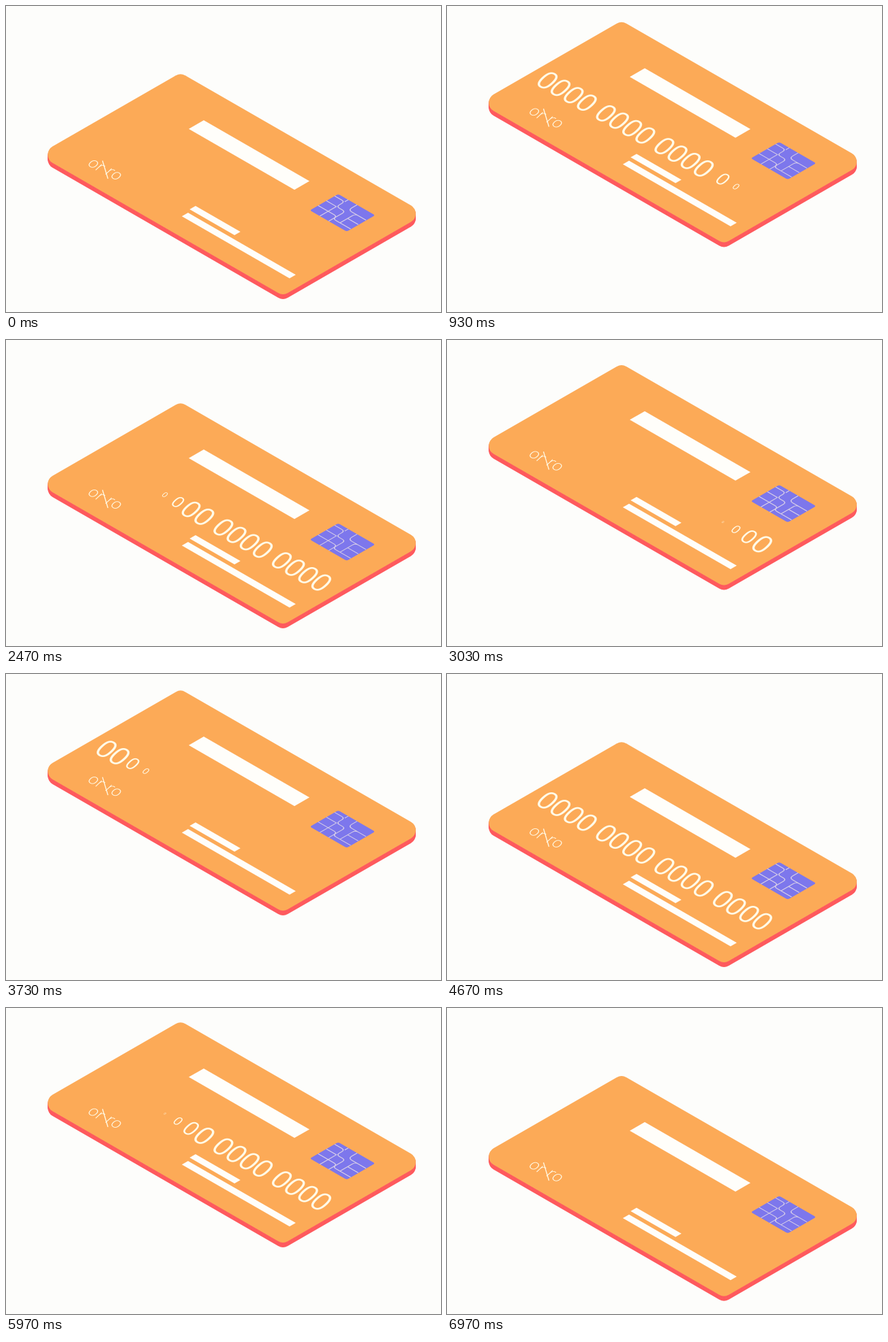
Animation of 638x450 px, one loop 7010 ms. Source, as an HTML page with a canvas:

```html
<!DOCTYPE html>
<html lang="en">
<head>
<meta charset="utf-8">
<title>Bank card</title>
<style>
  html, body { margin: 0; width: 100%; height: 100%; overflow: hidden; background: #fdfdfb; }
  canvas { display: block; }
</style>
</head>
<body>
<canvas id="stage" width="638" height="450"></canvas>
<script>
const ctx = document.getElementById('stage').getContext('2d');
const LOOP = 7010, FRAMES = 210, BOB = 70;
const COS = Math.cos(Math.PI / 6), SIN = 0.5;
const CARD = { x: 256, y: 98.2, w: 414.5, h: 241, r: 14, depth: 7 };
const COLOR = {
  back: '#fdfdfb', face: '#fcaa57', side: '#fe5a5e',
  bar: '#fffefa', ink: '#fffbe8', chip: '#7d77ec', wire: 'rgba(255,246,230,.7)'
};
const FONT = '"Open Sans", "Noto Sans", sans-serif';

// CSS-style cubic easing, solved by bisection
function bezier(x1, y1, x2, y2) {
  const at = (a, b, t) => 3 * (1 - t) * (1 - t) * t * a + 3 * (1 - t) * t * t * b + t * t * t;
  return x => {
    let lo = 0, hi = 1;
    for (let i = 0; i < 30; i++) {
      const mid = (lo + hi) / 2;
      if (at(x1, x2, mid) < x) lo = mid; else hi = mid;
    }
    return at(y1, y2, lo);
  };
}
const rise = bezier(0.3, 0.13, 0.5, 1);
const fall = bezier(0.5, 0, 0.68, 1);
const clamp = x => Math.max(0, Math.min(1, x));

// Vertical shift of the card, from 0 up to -80.5
function lift(frame) {
  const p = (frame % BOB) / (BOB / 2);
  return -80.5 * (p < 1 ? rise(p) : 1 - fall(p - 1));
}

function digitScale(frame, i) {
  const f = frame >= 104 ? frame - 104 : frame;
  const shown = clamp((f - 2 * i) / 6);
  const hidden = clamp((f - 61.7 - 2 * i) / 6);
  return shown - hidden;
}

// Card plane: x runs down-right, y runs down-left
function plane(y) {
  ctx.setTransform(COS, SIN, -COS, SIN, 256, 96.3 + y);
}

function box(x, y, w, h, r, color) {
  ctx.fillStyle = color;
  ctx.beginPath();
  ctx.roundRect(x, y, w, h, r);
  ctx.fill();
}

// Rhombus whose corners are rounded with true circles
function slab(y, color) {
  const { w, h, r } = CARD;
  const at = (u, v) => [CARD.x + (u - v) * COS, CARD.y + y + (u + v) * SIN];
  const corners = [at(w, 0), at(w, h), at(0, h), at(0, 0)];
  ctx.setTransform(1, 0, 0, 1, 0, 0);
  ctx.beginPath();
  ctx.moveTo(...at(w / 2, 0));
  corners.forEach((c, i) => ctx.arcTo(...c, ...corners[(i + 1) % 4], r));
  ctx.closePath();
  ctx.fillStyle = color;
  ctx.fill();
}

function cardBody(y) {
  for (let d = CARD.depth; d > 0; d--) slab(y + d, COLOR.side);
  slab(y, COLOR.face);
}

function chip() {
  ctx.save();
  ctx.translate(313.6, 46.6);
  box(0, 0, 62.5, 48, 3, COLOR.chip);
  ctx.strokeStyle = COLOR.wire;
  ctx.lineWidth = 1.2;
  ctx.stroke(new Path2D(
    'M0 6H12Q17 6 17 11V15Q17 20 22 20H27Q32 20 32 25V36Q32 41 37 41H62 ' +
    'M0 20H17V34 M0 34H27Q32 34 32 39V48 M17 34V48 ' +
    'M62 15H49Q44 15 44 20V41 M62 28H44 M32 0V9Q32 15 38 15H49 M17 6V0'));
  ctx.restore();
}

function word(text, x, y, size, weight, scale) {
  ctx.setTransform(COS * scale, SIN * scale, -0.75 * scale, 0.7 * scale, x, y);
  ctx.font = `${weight} ${size}px ${FONT}`;
  ctx.fillText(text, 0, 0.357 * size);
}

function digits(frame, y) {
  for (let i = 0; i < 16; i++) {
    const scale = digitScale(frame, i);
    if (scale < 0.02) continue;
    const s = 22.3 * i + 10.1 * Math.floor(i / 4);
    word('0', 147.5 + s * 0.863, 186 + s * 0.487 + y, 40.5, 500, scale);
  }
}

function label(y) {
  word('or', 133.5, 233 + y, 23, 300, 1);
  word('ro', 159.5, 246 + y, 23, 300, 1);
  ctx.setTransform(1, 0, 0, 1, 0, y);
  ctx.strokeStyle = COLOR.ink;
  ctx.lineWidth = 1.3;
  ctx.beginPath();
  ctx.moveTo(141.5, 227.5);
  ctx.lineTo(149.5, 254);
  ctx.stroke();
}

function draw(frame) {
  const y = lift(frame);
  ctx.setTransform(1, 0, 0, 1, 0, 0);
  ctx.fillStyle = COLOR.back;
  ctx.fillRect(0, 0, 638, 450);

  cardBody(y);
  plane(y);
  box(91.3, 52, 179, 25.4, 0, COLOR.bar);
  box(210.4, 185, 76, 10, 0, COLOR.bar);
  box(214, 201.3, 182.4, 10.5, 0, COLOR.bar);
  chip();

  ctx.fillStyle = COLOR.ink;
  ctx.textAlign = 'center';
  digits(frame, y);
  label(y);
}

const start = performance.now();
function tick() {
  const t = (performance.now() - start) % LOOP;
  draw(Math.floor(t * FRAMES / LOOP + 0.25) % FRAMES);
  requestAnimationFrame(tick);
}
tick();
</script>
</body>
</html>
```
